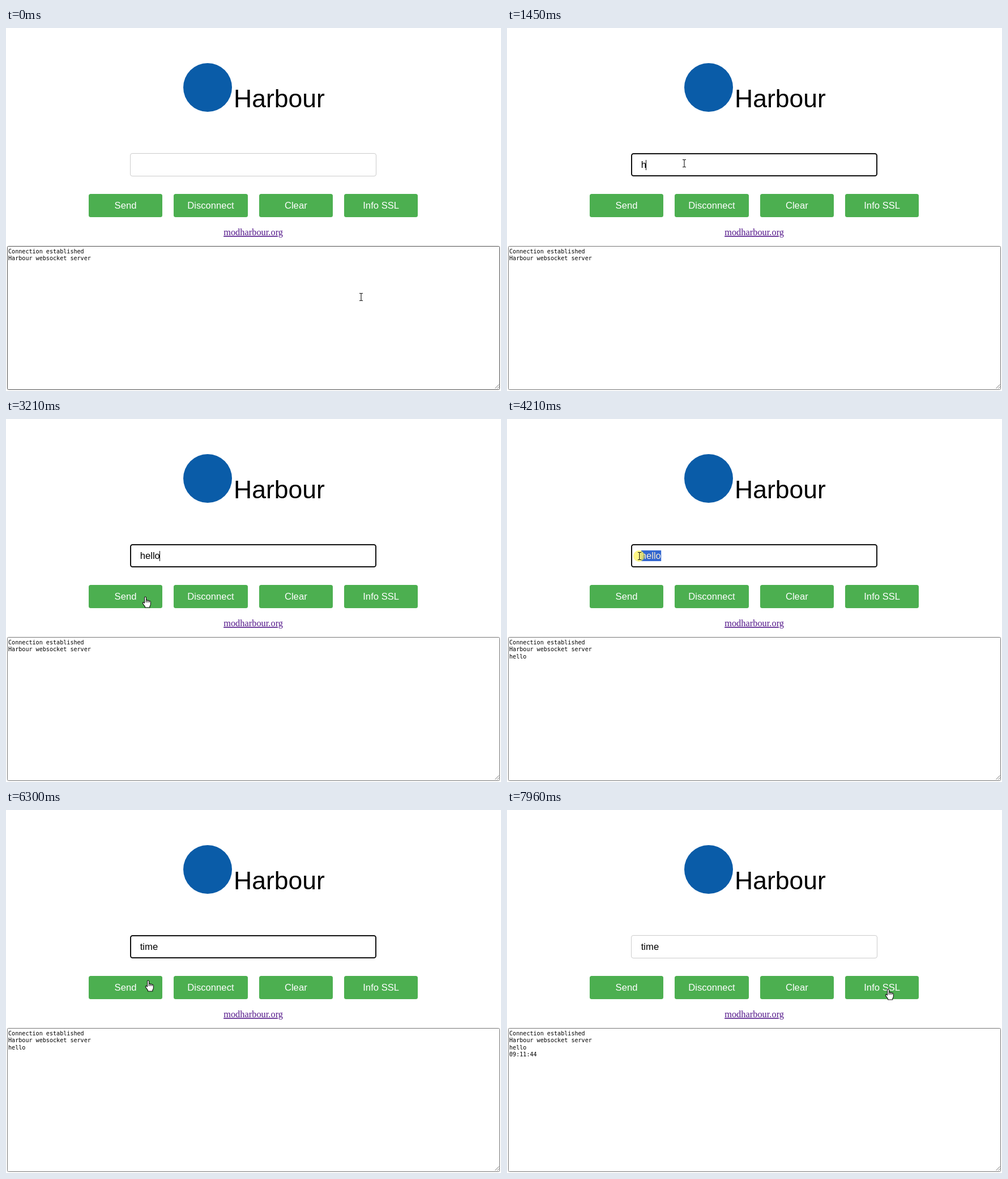
An HTML page for the animation above (8000 ms loop, 874 by 641 pixels).

```html
<!DOCTYPE html>
<html lang="en">
<head>
<meta charset="utf-8">
<title>Websocket client</title>
<style>
  html, body { margin: 0; width: 100%; height: 100%; overflow: hidden; background: #fff; }
  svg { display: block; width: 874px; height: 641px; }
  text { white-space: pre; }
  .ui { font: 16.67px "Liberation Sans", Arial, sans-serif; }
  .button { fill: #fff; text-anchor: middle; }
  .brand { font: 44.5px "Liberation Sans", Arial, sans-serif; }
  .link { font: 16.4px "Liberation Serif", "Times New Roman", serif; fill: #551a8b;
          text-anchor: middle; text-decoration: underline; }
  .log { font: 10.1px "DejaVu Sans Mono", monospace; }
</style>
</head>
<body>
<svg viewBox="0 0 874 641">
  <defs>
    <clipPath id="selected"><rect id="clip" y="232" height="19"/></clipPath>
  </defs>

  <circle cx="356" cy="105" r="43" fill="#0a5ca8"/>
  <text class="brand" x="402" y="140">Harbour</text>

  <rect id="field" fill="#fff"/>
  <rect id="selection" y="232" height="19" fill="#3367d1"/>
  <text id="typed" class="ui" x="236.7" y="247"/>
  <text id="typedSelected" class="ui" x="236.7" y="247" fill="#fff" clip-path="url(#selected)"/>
  <rect id="caret" y="233" width="1" height="18"/>

  <g id="buttons"></g>
  <text class="link" x="436.6" y="366">modharbour.org</text>

  <rect id="area" x="2.5" y="385.5" width="869" height="253" rx="2" fill="#fff"/>
  <path d="M863.5 636.5l7-7M867.5 636.5l3-3" stroke="#777" fill="none"/>
  <g id="log" class="log"></g>

  <circle id="press" r="10" fill="#fff23c" fill-opacity=".62"/>
  <g id="pointer">
    <path id="beam" d="M-3 -6.5H-1L0 -5.7L1 -6.5H3M0 -5.7V5.7M-3 6.5H-1L0 5.7L1 6.5H3"
          fill="none" stroke="#111" stroke-width="1.1"/>
    <path id="arrow" d="M0 0V13.2L3 10.4L5 15L7 14.1L5.1 9.6H9.2Z"
          fill="#fff" stroke="#111" stroke-linejoin="round"/>
    <g id="hand" fill="#fff" stroke="#111" stroke-width="1.1" stroke-linejoin="round">
      <path d="M-1.4 11V1.2Q-1.4 0 0 0T1.5 1.2V6Q3 5 4.2 6.6Q5.7 5.6 6.8 7.3
               Q9.3 6.8 9.3 9.4V13Q9.3 15.5 7.8 17V19H-.5V17.3L-4.3 12.2
               Q-5.2 9.7-3.2 9.6Z"/>
      <path d="M1.5 6V10M4.2 6.6V10M6.8 7.3V10" fill="none"/>
    </g>
  </g>
</svg>
<script>
const LOOP = 8000;
const BLINK = 550;
const CAPTURE = 110.6;
const TEXT_LEFT = 237;
const $ = id => document.getElementById(id);

const home = { x: 627, y: 475 };
const moves = [
  { from: 0, to: 660, x: 313, y: 239 },
  { from: 2540, to: 3200, x: 246, y: 314 },
  { from: 3430, to: 3870, x: 282, y: 243 },
  { from: 3870, to: 4200, x: 234, y: 242 },
  { from: 5870, to: 6300, x: 251, y: 301 },
  { from: 6520, to: 6860, x: 590, y: 400 },
  { from: 6860, to: 7070, x: 642, y: 371 },
  { from: 7070, to: 7420, x: 673, y: 316 }
];
const clicks = [
  { down: 660, up: 770 },
  { down: 3330, up: 3430 },
  { down: 3870, up: 4310 },
  { down: 6400, up: 6520 }
];
const words = [
  { text: 'hello', start: 1450, interval: 160 },
  { text: 'time', start: 4870, interval: 180 }
];
const greeting = ['Connection established', 'Harbour websocket server'];
const replies = ['hello', '09:11:44'];

const ease = p => p * p * (3 - 2 * p);
const mix = (a, b, p) => a + (b - a) * p;

const overArea = ({ y }) => y > 385;
const overField = ({ x, y }) => x > 219 && x < 654 && y > 221 && y < 262;
const overButton = ({ x, y }) =>
  y > 293 && y < 334 && x > 146 && x < 727 && (x - 146) % 150.4 < 130.4;

function pointerAt(time) {
  const sampled = Math.floor((time + 14) / CAPTURE) * CAPTURE;
  let point = home;
  for (const { from, to, x, y } of moves) {
    if (sampled < from) break;
    const p = ease(Math.min(1, (sampled - from) / (to - from)));
    point = { x: mix(point.x, x, p), y: mix(point.y, y, p) };
  }
  return point;
}

for (const click of clicks) click.onField = overField(pointerAt(click.down));

function typingAt(time) {
  const word = words.findLast(({ start }) => start <= time);
  if (!word) return { text: '', lastKey: 0 };
  const { text, start, interval } = word;
  const count = Math.min(text.length, Math.floor((time - start) / interval) + 1);
  return { text: text.slice(0, count), lastKey: start + (count - 1) * interval };
}

function setAttrs(node, attrs) {
  for (const [name, value] of Object.entries(attrs)) node.setAttribute(name, value);
}

function add(parent, tag, attrs, text = '') {
  const node = document.createElementNS('http://www.w3.org/2000/svg', tag);
  setAttrs(node, attrs);
  node.textContent = text;
  return parent.appendChild(node);
}

function show(node, visible) {
  node.style.display = visible ? '' : 'none';
}

['Send', 'Disconnect', 'Clear', 'Info SSL'].forEach((label, i) => {
  const left = 145.8 + i * 150.4;
  const x = Math.round(left);
  const width = Math.round(left + 130.4) - x;
  add($('buttons'), 'rect', { x, y: 293, width, height: 41, rx: 3.5, fill: '#4caf50' });
  add($('buttons'), 'text', { class: 'ui button', x: left + 65.2, y: 319 }, label);
});
const logNodes = [...greeting, ...replies].map((line, i) =>
  add($('log'), 'text', { x: 4, y: Math.round(397.6 + i * 12.5) }, line));

function drawField(focused) {
  const line = focused ? 2 : 1;
  setAttrs($('field'), {
    x: 219 + line / 2, y: 221 + line / 2, width: 435 - line, height: 41 - line, rx: 3.5,
    stroke: focused ? '#101010' : '#ccc', 'stroke-width': line
  });
}

function drawText(text, selecting, pointerX, caretLit) {
  $('typed').textContent = $('typedSelected').textContent = text;
  const edges = Array.from({ length: text.length + 1 }, (_, i) =>
    TEXT_LEFT + (i ? $('typed').getSubStringLength(0, i) : 0));
  const end = edges.at(-1);
  const from = selecting ? edges.find(edge => edge >= pointerX) ?? end : end;
  for (const id of ['selection', 'clip']) setAttrs($(id), { x: from, width: end - from });
  setAttrs($('caret'), { x: Math.floor(end - 0.8) });
  show($('caret'), caretLit && from === end);
}

function drawPointer(point, pressed) {
  const kind = overArea(point) || overField(point) ? 'beam'
    : overButton(point) ? 'hand' : 'arrow';
  for (const id of ['beam', 'hand', 'arrow']) show($(id), id === kind);
  setAttrs($('pointer'), {
    transform: `translate(${Math.round(point.x)} ${Math.round(point.y)})`
  });
  setAttrs($('press'), { cx: point.x - 1, cy: point.y });
  show($('press'), pressed);
  setAttrs($('area'), { stroke: overArea(point) ? '#4f4f4f' : '#767676' });
}

function draw(time) {
  const point = pointerAt(time);
  const { text, lastKey } = typingAt(time);
  const click = clicks.findLast(({ down }) => down <= time);
  const focused = Boolean(click?.onField);
  const lastInput = Math.max(lastKey, click?.down ?? 0);
  const caretLit = focused && Math.floor((time - lastInput) / BLINK) % 2 === 0;
  const sent = clicks.filter(({ up, onField }) => up <= time && !onField).length;

  drawField(focused);
  drawText(text, focused && click.down > lastKey, point.x, caretLit);
  drawPointer(point, Boolean(click && time < click.up));
  logNodes.forEach((node, i) => show(node, i < greeting.length + sent));
}

const start = performance.now();
function tick() {
  draw((performance.now() - start) % LOOP);
  requestAnimationFrame(tick);
}
tick();
</script>
</body>
</html>
```
